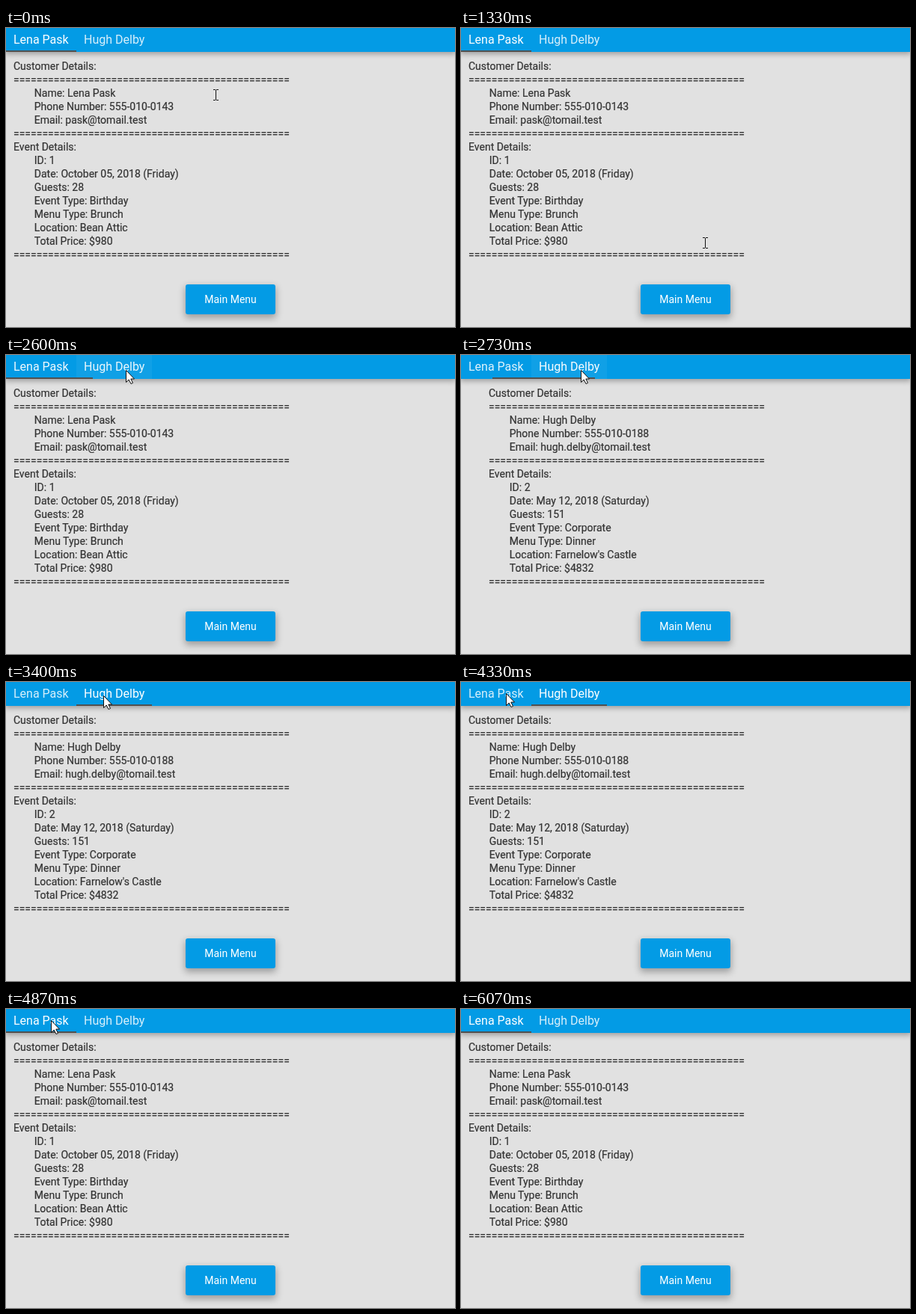
An HTML page for the animation above (7.87 s loop, 600 px wide and 400 px high).

```html
<!DOCTYPE html>
<html lang="en">
<head>
<meta charset="utf-8">
<title>Booking details</title>
<style>
html, body { margin: 0; width: 100%; height: 100%; overflow: hidden; }
body { background: #e1e1e1; }
#stage { position: absolute; left: 0; top: 0; width: 600px; height: 400px; overflow: hidden; background: #e1e1e1; font: 14px/18px Roboto, sans-serif; color: #333; cursor: default; }
#bar { position: absolute; left: 0; top: 0; width: 600px; height: 32px; background: #039be5; box-shadow: 0 2px 7px 1px rgba(0, 0, 0, .3); }
.tab { position: absolute; top: 0; height: 32px; overflow: hidden; font-size: 16px; line-height: 32px; color: #fff; white-space: nowrap; }
.tab span { position: absolute; left: 10px; top: 0; }
.ripple { position: absolute; width: 260px; height: 260px; margin: -130px; border-radius: 50%; background: #fff; }
#line { position: absolute; top: 29.5px; height: 2px; background: #505050; }
#pages { position: absolute; left: 0; top: 0; }
pre { position: absolute; top: 42px; margin: 0; font: inherit; white-space: pre; tab-size: 8; -webkit-text-stroke: .2px #333; }
#menu { position: absolute; left: 240px; top: 343px; width: 120px; height: 40px; border-radius: 3px; background: #039be5; color: #fff; line-height: 40px; text-align: center; box-shadow: 0 4px 10px 1px rgba(0, 0, 0, .3); }
svg { position: absolute; left: 0; top: 0; overflow: visible; }
</style>
</head>
<body>
<div id="stage">
  <div id="pages"></div>
  <div id="bar">
    <div class="tab" style="left:0;width:94px"><div class="ripple"></div><span>Lena Pask</span></div>
    <div class="tab" style="left:94px;width:101px"><div class="ripple"></div><span>Hugh Delby</span></div>
    <div id="line"></div>
  </div>
  <div id="menu">Main Menu</div>
  <svg width="1" height="1">
    <g id="pointer">
      <path id="arrow" d="M.5 .5V16.5L4.2 13L7 18.5L9.5 17.4L6.8 12H11.5Z" fill="#fff" stroke="#111"/>
      <path id="beam" d="M-3-7h3v1h-3zM1-7h3v1h-3zM0-6h1v13h-1zM-3 7h3v1h-3zM1 7h3v1h-3z" fill="#111" shape-rendering="crispEdges"/>
    </g>
  </svg>
</div>
<script>
const LOOP = 7870, STEP = 1000 / 15;
const $ = id => document.getElementById(id);
const tabs = [...document.querySelectorAll('.tab')];

const rule = '='.repeat(48);
const bookings = [
  { name: 'Lena Pask', phone: '555-010-0143', email: 'pask@tomail.test', id: 1,
    date: 'October 05, 2018 (Friday)', guests: 28, event: 'Birthday', menu: 'Brunch',
    place: 'Bean Attic', price: 980 },
  { name: 'Hugh Delby', phone: '555-010-0188', email: 'hugh.delby@tomail.test', id: 2,
    date: 'May 12, 2018 (Saturday)', guests: 151, event: 'Corporate', menu: 'Dinner',
    place: "Farnelow's Castle", price: 4832 },
];

bookings.forEach((b, i) => {
  const pre = document.createElement('pre');
  pre.style.left = 10 + 600 * i + 'px';
  pre.textContent = [
    'Customer Details:', rule,
    `\tName: ${b.name}`, `\tPhone Number: ${b.phone}`, `\tEmail: ${b.email}`,
    rule, 'Event Details:',
    `\tID: ${b.id}`, `\tDate: ${b.date}`, `\tGuests: ${b.guests}`,
    `\tEvent Type: ${b.event}`, `\tMenu Type: ${b.menu}`,
    `\tLocation: ${b.place}`, `\tTotal Price: $${b.price}`, rule,
  ].join('\n');
  $('pages').append(pre);
});

const clamp = v => Math.min(1, Math.max(0, v));
const mix = (a, b, p) => a + (b - a) * p;
const span = (t, a, b) => clamp((t - a) / (b - a));
const smooth = u => u * u * (3 - 2 * u);

// quadratic ramps at both ends, linear between
function easeBoth(u) {
  if (u < .2) return 3.125 * u * u;
  if (u > .8) return 1 - 3.125 * (1 - u) ** 2;
  return 1.25 * u - .125;
}

// each hand movement follows a line or a Bézier curve
const home = [280, 89], button = [315, 280], rest = [326, 287], tab2 = [160, 20], tab1 = [60, 15];
const moves = [
  { from: 0, to: 600, path: [home, [330, 130], [380, 240], button] },
  { from: 867, to: 1333, path: [button, rest] },
  { from: 1333, to: 2267, path: [rest, [300, 410], [175, 60], tab2] },
  { from: 3133, to: 3867, path: [tab2, tab1] },
  { from: 5467, to: 6000, path: [tab1, [15, 108]] },
];
const HIDE = 6060;
const clicks = [{ at: 37 * STEP, to: 1, spot: tab2 }, { at: 68 * STEP, to: 0, spot: tab1 }];

function along(points, p) {
  if (points.length === 1) return points[0];
  return along(points.slice(1).map(([x, y], i) => [mix(points[i][0], x, p), mix(points[i][1], y, p)]), p);
}

function pointerAt(t) {
  const move = moves.filter(m => t >= m.from).pop();
  return along(move.path, smooth(span(t, move.from, move.to))).map(Math.round);
}

// the underline stretches toward the new tab, then shrinks onto it
function underline(dt, to) {
  const first = easeBoth(span(dt, 92, 212)), second = easeBoth(span(dt, 212, 332));
  const reach = 94 / 1.3 * first;
  if (to) return [mix(0, 94, second), mix(94 + reach, 101, second)];
  return [mix(94 - reach, 0, second), mix(101 + reach, 94, second)];
}

function draw(now) {
  const t = Math.floor((now + 4) / STEP) * STEP;

  const [x, y] = pointerAt(t), onText = y > 41;
  $('pointer').setAttribute('transform', `translate(${x} ${y})`);
  $('pointer').style.display = t < HIDE ? '' : 'none';
  $('beam').style.display = onText ? '' : 'none';
  $('arrow').style.display = onText ? 'none' : '';

  const click = clicks.filter(c => t >= c.at - 1).pop();
  const dt = click ? t - click.at : LOOP, to = click ? click.to : 0;
  const slide = easeBoth(span(dt, 132.5, 285));
  const page = to ? slide : 1 - slide;
  $('pages').style.transform = `translateX(${-Math.round(600 * page)}px)`;

  const [left, width] = underline(dt, to);
  $('line').style.left = left + 'px';
  $('line').style.width = width + 'px';

  const fade = span(dt, 0, 330);
  tabs.forEach((tab, i) => {
    tab.lastChild.style.opacity = mix(.84, 1, i === to ? fade : 1 - fade);
    const ripple = tab.firstChild, live = click && i === to && dt < 320;
    ripple.style.opacity = live ? .05 : 0;
    if (live) {
      ripple.style.left = click.spot[0] - tab.offsetLeft + 'px';
      ripple.style.top = click.spot[1] + 'px';
      ripple.style.transform = `scale(${mix(.15, 1, span(dt, 0, 170))})`;
    }
  });
}

const start = performance.now();
function tick() {
  draw((performance.now() - start) % LOOP);
  requestAnimationFrame(tick);
}
tick();
</script>
</body>
</html>
```
